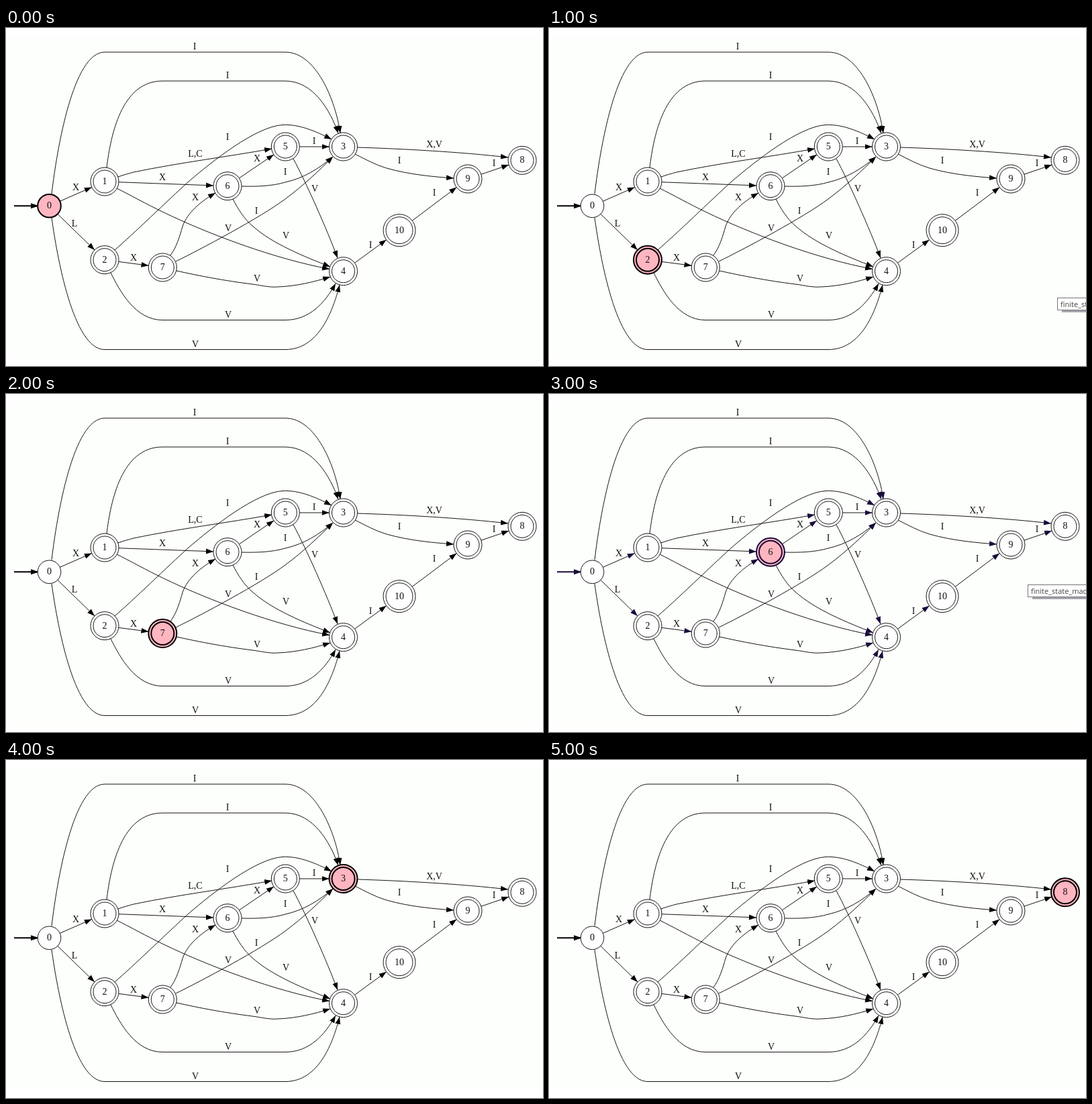
An HTML page for the animation above (6000 ms loop, 800x504 px).

```html
<!DOCTYPE html>
<html lang="en">
<head>
<meta charset="utf-8">
<title>State machine walk</title>
<style>
html, body { margin: 0; width: 100%; height: 100%; overflow: hidden; background: #fff; }
svg { display: block; width: 800px; height: 504px; color: #000; }
.edges path { fill: none; stroke: #161616; stroke-width: 1; marker-end: url(#head); }
.edges .entry { stroke: currentColor; stroke-width: 2; marker-end: url(#entryHead); }
.nodes circle { fill: #fff; stroke: #161616; stroke-width: 1; }
.nodes .active circle { fill: #ffb6c1; stroke: currentColor; stroke-width: 2; }
text { font: 14px "Liberation Serif", "Times New Roman", serif; fill: #111; text-anchor: middle; }
.tip text { font: 11px "Open Sans", "Noto Sans", sans-serif; fill: #444; text-anchor: start; }
</style>
</head>
<body>
<svg viewBox="0 0 800 504">
  <defs>
    <marker id="head" markerUnits="userSpaceOnUse" markerWidth="12" markerHeight="10" refX="11" refY="5" orient="auto">
      <path d="M0 1L11 5L0 9Z" fill="currentColor"/>
    </marker>
    <marker id="entryHead" markerUnits="userSpaceOnUse" markerWidth="14" markerHeight="10" refX="11" refY="5" orient="auto">
      <path d="M0 1L12 5L0 9Z" fill="currentColor"/>
    </marker>
  </defs>
  <rect y="12" width="800" height="481" fill="#fdfffc"/>
  <g class="edges">
    <path class="entry" d="M12 265.3H48"/>
    <path d="M68 247.5C76 180 100 36 147 36H416C462 36 491 108 498 157"/>
    <path d="M150 208C156 160 172 79 233 79H416C458 79 483 123 495 157"/>
    <path d="M162 331C190 307 240 258 272 229C307 199 372 147 412 144.5C436 143 462 154 485 166"/>
    <path d="M167 222C175 219 183 217 190 215C257 201 330 192 396 180"/>
    <path d="M165 239C185 249 210 263 233 274C303 308 400 344 482 359.5"/>
    <path d="M351 236C372 236.5 396 236 416 230C443 224 466 210 487 192"/>
    <path d="M338 255C345 269 355 285 367 295C397 322 445 341 483 356"/>
    <path d="M245 339C254 327 259 310 263 296C270 275 291 258 312 246"/>
    <path d="M253 348C290 330 380 282 416 255C443 235 467 212 487 192"/>
    <path d="M254 362C285 369 326 377 367 382C382 384 392 387 405 386C432 385 458 379 483 371"/>
    <path d="M428 195C446 228 478 300 494 343"/>
    <path d="M156 365C170 393 193 435.5 233 435.5H416C452 435.5 475 410 491 381"/>
    <path d="M68 283C76 340 100 479.5 147 479.5H416C466 479.5 487 422 497 383"/>
    <path d="M523 178C590 180 680 185 748 193"/>
    <path d="M520 188C534 195 550 204 567 209C602 219 640 222 667 224"/>
  </g>
  <g class="nodes"></g>
  <g class="labels"></g>
  <g class="tip">
    <path d="M7 20.5H200" stroke="#a5a5ad" stroke-width="3"/>
    <rect x=".5" y=".5" width="120" height="18" fill="#fff" stroke="#767676"/>
    <text x="5" y="13.5">finite_state_machine</text>
  </g>
</svg>
<script>
const $ = (selector) => document.querySelector(selector);

function add(parent, tag, attrs, text = "") {
  const el = document.createElementNS("http://www.w3.org/2000/svg", tag);
  for (const key in attrs) el.setAttribute(key, attrs[key]);
  el.textContent = text;
  return parent.appendChild(el);
}

// Centres of states 0 to 10
const centres = [
  [64.5, 265.3], [147, 229], [147, 345.7], [502.5, 177], [502.5, 362.7], [416.3, 177],
  [330, 235.7], [233.3, 357], [769, 197.3], [688, 225], [586, 301.7]
];
const radius = (id) => id === 0 ? 17.3 : id === 10 ? 24 : 21;

const straightEdges = [[0, 1], [0, 2], [1, 6], [2, 7], [6, 5], [5, 3], [4, 10], [10, 9], [9, 8]];
for (const [from, to] of straightEdges) {
  const [x1, y1] = centres[from], [x2, y2] = centres[to];
  const length = Math.hypot(x2 - x1, y2 - y1);
  const ux = (x2 - x1) / length, uy = (y2 - y1) / length;
  const a = radius(from), b = radius(to);
  add($(".edges"), "path", { d: `M${x1 + ux * a} ${y1 + uy * a}L${x2 - ux * b} ${y2 - uy * b}` });
}

const nodes = centres.map(([cx, cy], id) => {
  const group = add($(".nodes"), "g", {});
  const r = radius(id);
  add(group, "circle", { cx, cy, r });
  if (id) add(group, "circle", { cx, cy, r: r - 4 });
  add(group, "text", { x: cx, y: cy + 4 }, id);
  return group;
});

const labels = {
  "I": [[281, 32], [330, 75], [330, 167], [459, 173], [416, 219], [373, 277], [586, 202], [727, 206], [638, 250], [543, 328]],
  "V": [[460, 244], [331, 303], [417, 314], [374, 378], [331, 432], [282, 476]],
  "X": [[104, 242], [233, 227], [374, 199], [282, 257], [190, 347]],
  "L": [[102, 296]],
  "L,C": [[282, 192]],
  "X,V": [[638, 178]]
};
for (const text in labels)
  for (const [x, y] of labels[text]) add($(".labels"), "text", { x, y }, text);

const stepMs = 1000;
const steps = [
  { state: 0 },
  { state: 2, tip: [757, 402] },
  { state: 7 },
  { state: 6, tip: [713, 284], ink: "#1b0b3b" },
  { state: 3 },
  { state: 8 }
];
const tip = $(".tip");
let shown;

function draw() {
  const step = steps[Math.floor(performance.now() / stepMs) % steps.length];
  if (step !== shown) {
    shown = step;
    nodes.forEach((node, id) => node.classList.toggle("active", id === step.state));
    $("svg").style.color = step.ink || "#000";
    tip.style.display = step.tip ? "" : "none";
    if (step.tip) tip.setAttribute("transform", `translate(${step.tip})`);
  }
  requestAnimationFrame(draw);
}
draw();
</script>
</body>
</html>
```
